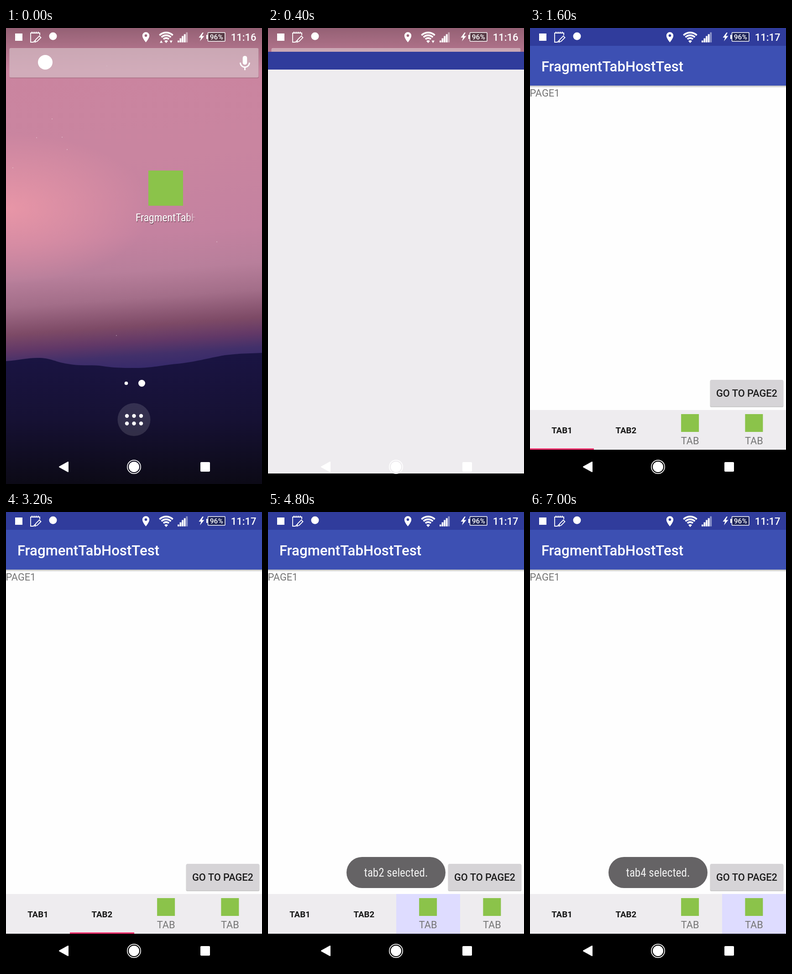
An HTML page that plays this animation: 561 by 998 pixels, repeating every 8000 ms.

```html
<!DOCTYPE html>
<html lang="en">
<head>
<meta charset="utf-8">
<title>Tab host demo</title>
<style>
  html, body { margin: 0; width: 100%; height: 100%; overflow: hidden; background: #000; }
  svg { display: block; width: 100vw; height: 100vh; }
  text { font-family: Roboto, sans-serif; font-size: 21.8px; }
  .mid { text-anchor: middle; }
  .medium { font-weight: 500; }
  .grey { fill: #757575; }
  .narrow { font-family: "Roboto Condensed", Roboto, sans-serif; font-stretch: condensed; }
  .toast text { font-size: 25px; fill: #f0f0f0; }
  .label { font-size: 23.6px; fill: #fff; }
  .loose .toast text { font-size: 22px; }
  .loose .label { font-size: 20.6px; }
  .tab { font-size: 18.7px; font-weight: 700; fill: #161616; }
</style>
</head>
<body>
<svg id="stage" viewBox="0 0 561 998">
  <defs>
    <linearGradient id="sky" gradientUnits="userSpaceOnUse" x1="0" y1="0" x2="70" y2="998">
      <stop offset="0" stop-color="#cb849f"/>
      <stop offset=".3" stop-color="#c985a0"/>
      <stop offset=".47" stop-color="#c482a0"/>
      <stop offset=".55" stop-color="#b87f9b"/>
      <stop offset=".61" stop-color="#a36e89"/>
      <stop offset=".67" stop-color="#7d4a66"/>
      <stop offset=".705" stop-color="#623867"/>
      <stop offset=".735" stop-color="#42306a"/>
      <stop offset=".77" stop-color="#33286a"/>
    </linearGradient>
    <radialGradient id="glow" gradientUnits="userSpaceOnUse" cx="0" cy="0" r="1" gradientTransform="matrix(320 0 0 165 0 395)">
      <stop offset="0" stop-color="#ee99a8" stop-opacity=".85"/>
      <stop offset="1" stop-color="#ee99a8" stop-opacity="0"/>
    </radialGradient>
    <linearGradient id="hill" x2="0" y2="1">
      <stop offset="0" stop-color="#1a1443"/>
      <stop offset=".5" stop-color="#161134"/>
      <stop offset="1" stop-color="#0c0a16"/>
    </linearGradient>
    <linearGradient id="shade" x2="0" y2="1">
      <stop offset="0" stop-opacity=".27"/>
      <stop offset="1" stop-opacity="0"/>
    </linearGradient>
    <linearGradient id="fade" gradientUnits="userSpaceOnUse" x1="396" x2="418" y1="0" y2="0">
      <stop offset="0" stop-color="#fff"/>
      <stop offset="1" stop-color="#000"/>
    </linearGradient>
    <mask id="labelMask" maskUnits="userSpaceOnUse" x="280" y="395" width="135" height="40">
      <rect x="280" y="395" width="135" height="40" fill="url(#fade)"/>
    </mask>
  </defs>

  <g id="home">
    <rect width="561" height="998" fill="url(#sky)"/>
    <rect width="561" height="700" fill="url(#glow)"/>
    <g id="stars" fill="#fff" opacity=".4"></g>
    <path fill="url(#hill)" d="M0 729C30 727 50 721 75 722C100 723 108 731 135 735C160 740 185 737 205 739C235 744 255 744 285 744C320 744 340 738 375 735C415 731 440 723 480 716C510 712 540 712 561 711V998H0Z"/>
    <rect width="561" height="95" fill="url(#shade)"/>
    <rect x="8" y="45" width="546" height="65" rx="3" fill="#000" opacity=".16"/>
    <rect x="7.500" y="44" width="546" height="64.500" rx="3" fill="#e3c6d0" opacity=".7"/>
    <circle cx="86" cy="75" r="16" fill="#fff"/>
    <g stroke="#fff" fill="none" stroke-width="2.800">
      <path d="M513.500 75.700a10 10 0 0 0 20 0M523.500 85.700v6.500"/>
      <path d="M523.500 65.700v10" stroke-width="9.600" stroke-linecap="round"/>
    </g>
    <rect x="312" y="312" width="76" height="77" fill="#8bc34a"/>
    <g mask="url(#labelMask)">
      <text class="narrow label" x="285" y="424.500" style="fill:#000;opacity:.35">FragmentTabHostTest</text>
      <text class="narrow label" x="284" y="423">FragmentTabHostTest</text>
    </g>
    <g fill="#fff">
      <circle cx="263.500" cy="777.500" r="3.800"/>
      <circle cx="297.500" cy="777.500" r="7.500"/>
      <circle cx="280.500" cy="857" r="36" opacity=".13"/>
      <g id="dots"></g>
    </g>
  </g>

  <rect id="navBar" y="923" width="561" height="75"/>

  <g id="splash">
    <rect width="561" height="923" fill="#eeecef"/>
    <rect width="561" height="39" fill="#303c9c"/>
  </g>

  <g id="app">
    <rect y="39" width="561" height="884" fill="#fefefe"/>
    <rect y="126" width="561" height="5" fill="url(#shade)"/>
    <rect y="39" width="561" height="87" fill="#3d50b3"/>
    <text class="medium" x="24.900" y="95" fill="#fff" style="font-size:31.160px">FragmentTabHostTest</text>
    <text class="grey" x="-.5" y="150">PAGE1</text>
    <rect x="394.500" y="771" width="161" height="59" rx="3" opacity=".2"/>
    <rect x="395" y="770" width="160" height="58" rx="3" fill="#d6d4d7"/>
    <text class="mid medium" x="475" y="807" fill="#1c1c1c">GO TO PAGE2</text>
    <rect y="836" width="561" height="87" fill="#eeecef"/>
    <rect id="mark"/>
    <text class="mid tab" x="70" y="887">TAB1</text>
    <text class="mid tab" x="210.400" y="887">TAB2</text>
    <g id="iconTabs"></g>
    <g id="toasts"></g>
  </g>

  <g fill="#fff">
    <path d="M117 960.500L136 950V971Z" stroke="#fff" stroke-width="2" stroke-linejoin="round"/>
    <circle cx="280.500" cy="960.500" r="11.500"/>
    <circle cx="280.500" cy="960.500" r="14.600" fill="none" stroke="#fff" stroke-width="1.700"/>
    <rect x="426" y="950" width="21" height="21" rx="2"/>
  </g>

  <g fill="#fff">
    <rect x="20" y="12" width="16" height="16"/>
    <g fill="none" stroke="#fff" stroke-width="1.800">
      <path d="M74 16V11H54V31H60L64 27"/>
      <path d="M57 8v4M61.500 8v4M66 8v4M70.500 8v4" stroke-width="2"/>
      <path d="M63.500 31l1.500-5.500 8-8 3.500 3.500-8 8Z"/>
    </g>
    <circle cx="103" cy="18" r="8.500"/>
    <path fill-rule="evenodd" d="M306.500 9a7.700 7.700 0 0 0-7.700 7.700c0 5.700 7.700 14.600 7.700 14.600s7.700-8.900 7.700-14.600a7.700 7.700 0 0 0-7.700-7.700zm0 4.800a2.800 2.800 0 1 1 0 5.600a2.800 2.800 0 0 1 0-5.600z"/>
    <g id="wifi" fill="none" stroke="#fff" stroke-width="3.800"></g>
    <path d="M351 33l-4-4.500a5.500 5.500 0 0 1 8 0Z"/>
    <path id="upArrow" d="M337 32.500h6.400l-3.200-5.500z"/>
    <path id="downArrow" d="M358.500 27.500h6.400l-3.200 5.500z"/>
    <g id="bars"></g>
    <path d="M430.500 10l-8 11h5l-2.500 8 9.500-11.500h-5.500l4-7.500z"/>
    <rect x="439" y="15" width="3" height="9"/>
    <rect x="442.500" y="10" width="37.500" height="19" rx="1" fill="#000" fill-opacity=".45" stroke="#fff" stroke-width="1.500"/>
    <text class="mid medium" x="461.300" y="25" style="font-size:15.500px">96%</text>
    <text id="clock" class="medium" x="548.500" y="28" text-anchor="end" style="font-size:22px"></text>
  </g>
</svg>
<script>
const LOOP = 8000, STEP = 100, TAB_W = 140.25;
const $ = id => document.getElementById(id);
const set = (el, attrs) => { for (const k in attrs) el.setAttribute(k, attrs[k]); };
const add = (parent, tag, attrs, text = '') => {
  const el = document.createElementNS('http://www.w3.org/2000/svg', tag);
  set(el, attrs);
  el.textContent = text;
  return $(parent).appendChild(el);
};
const clamp = x => Math.min(1, Math.max(0, x));
const show = (id, on) => { $(id).style.visibility = on ? 'visible' : 'hidden'; };

for (const [cx, cy] of [[101, 199], [123, 239], [67, 240], [15, 306], [134, 266], [462, 468], [242, 673], [221, 83]])
  add('stars', 'circle', { cx, cy, r: 1 });
for (let i = 0; i < 6; i++)
  add('dots', 'circle', { cx: 265 + 15.5 * (i % 3), cy: i < 3 ? 849 : 865.5, r: 4.2 });
for (const r of [20.5, 14.5, 8.5]) {
  const d = r * Math.SQRT1_2;
  add('wifi', 'path', { d: `M${351 - d} ${30.5 - d}A${r} ${r} 0 0 1 ${351 + d} ${30.5 - d}` });
}
[4, 9, 14, 18, 22].forEach((h, i) =>
  add('bars', 'rect', { x: 376 + 4.6 * i, y: 31.5 - h, width: 3.8, height: h, opacity: i < 4 ? 1 : 0.45 }));
for (const i of [2, 3]) {
  const x = TAB_W * (i + 0.5);
  add('iconTabs', 'rect', { x: x - 19.5, y: 845, width: 39, height: 39, fill: '#8bc34a' });
  add('iconTabs', 'text', { class: 'mid grey', x, y: 911 }, 'TAB');
}

// Moment at which each tab is tapped
const taps = [0, 3200, 4800, 6400];
const toasts = taps.slice(1).map((at, i) => {
  const g = add('toasts', 'g', { class: 'toast' });
  g.id = 'toast' + i;
  add(g.id, 'rect', { x: 172, y: 755, width: 217, height: 68, rx: 34, fill: '#656365' });
  add(g.id, 'text', { class: 'mid narrow', x: 280.5, y: 798 }, `tab${i + 2} selected.`);
  return { g, start: at + 130, end: (taps[i + 2] ?? Infinity) + 130 };
});

// Smaller type where no condensed face is present
if (toasts[0].g.lastChild.getComputedTextLength() > 150) $('stage').classList.add('loose');

function draw(t) {
  // The window rises from 110% of the stage height, slowing sharply
  const slide = clamp((t - 240) / 350);
  const offset = 1.1 * 998 * (1 - slide) ** 5;
  set($('splash'), { transform: `translate(0 ${Math.round(offset)})`, opacity: t < 400 ? 0.87 : 1 });
  show('splash', slide > 0);
  show('navBar', t >= 400);

  $('app').setAttribute('opacity', 1 - (1 - clamp((t - 1300) / 300)) ** 2);
  show('app', t >= 1400);

  const tab = taps.filter(at => t >= at).length - 1;
  const x = Math.round(TAB_W * tab), width = Math.round(TAB_W * (tab + 1)) - x;
  set($('mark'), tab < 2
    ? { x, width, y: 920, height: 3, fill: '#f0306d' }
    : { x, width, y: 836, height: 87, fill: '#dedcff' });

  for (const { g, start, end } of toasts) {
    const enter = 1 - (1 - clamp((t - start) / 500)) ** 2;
    const leave = 1 - clamp((t - end) / 500) ** 2;
    g.setAttribute('opacity', enter * leave);
  }

  show('upArrow', t < 100);
  show('downArrow', t < 1200);
  $('clock').textContent = t < 1000 ? '11:16' : '11:17';
}

const began = performance.now();
function tick() {
  const t = (performance.now() - began) % LOOP;
  draw(Math.floor(t / STEP) * STEP);
  requestAnimationFrame(tick);
}
tick();
</script>
</body>
</html>
```
